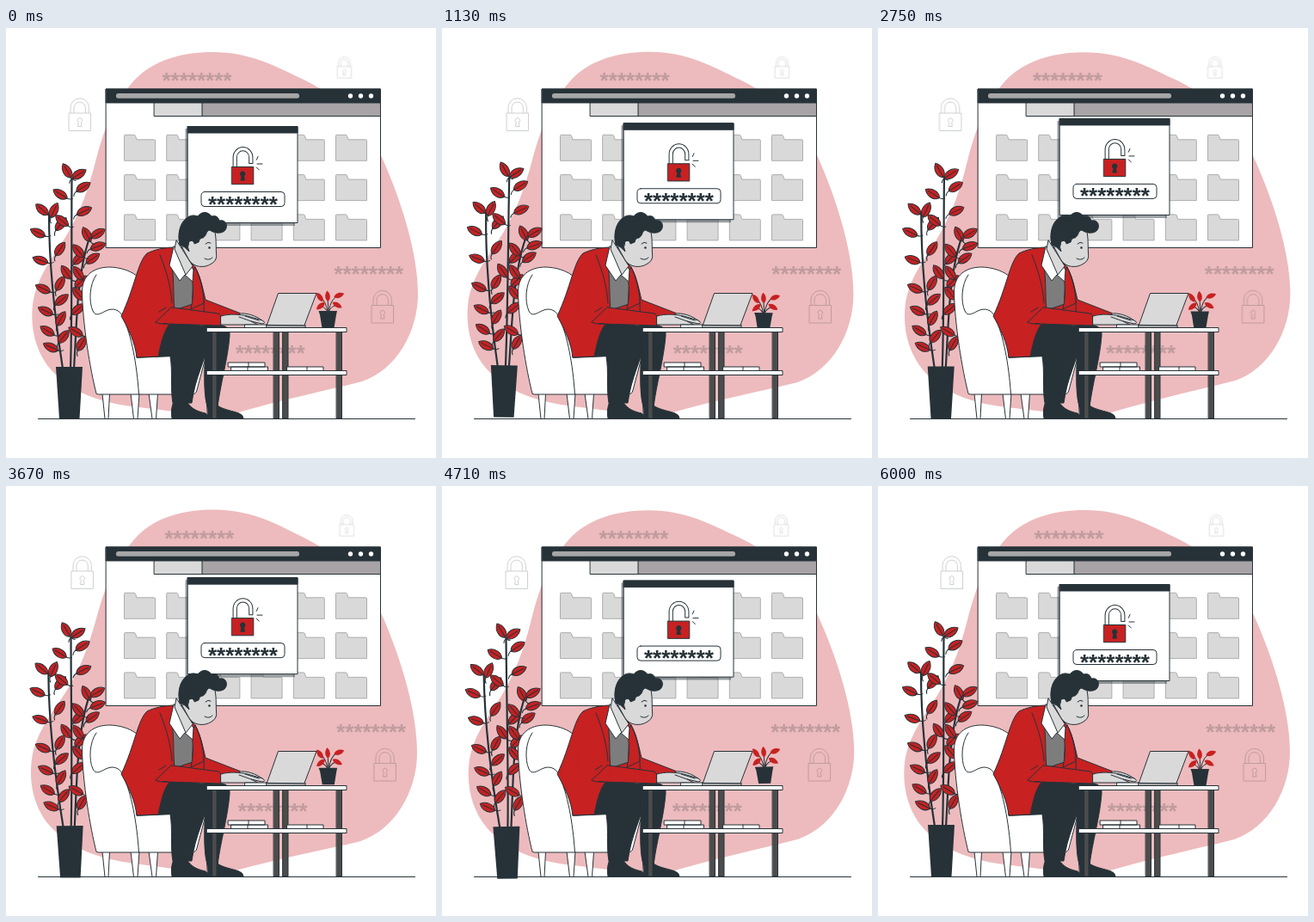
These frames come from a looping animation (500 by 500 pixels, 6.04 s). An HTML page:

```html
<!DOCTYPE html>
<html lang="en">
<head>
<meta charset="utf-8">
<title>Password security</title>
<style>
  html, body { margin: 0; width: 100%; height: 100%; overflow: hidden; background: #fff; }
  svg { display: block; width: 100%; height: 100%; }
  text { font: bold 26px "Liberation Sans", Arial, sans-serif; }
  .ink { fill: #263238; }
  .red { fill: #c72122; }
  .grey { fill: #d9d9d9; }
  .white { fill: #fff; }
  .none { fill: none; }
  .line { stroke: #263238; stroke-width: 1; stroke-linejoin: round; stroke-linecap: round; }
</style>
</head>
<body>
<svg viewBox="0 0 500 500">
  <defs>
    <path id="folder" d="M0 1.5Q0 .5 1 .5H11.5Q12.5 .5 13 1.5L14.5 6H35Q36 6 36 7V30.5H0Z" fill="#d9d9d9" stroke="#a6a6a6" stroke-width=".9"/>
    <g id="leaf">
      <path class="line" fill="none" stroke-width="1.5" d="M-15 3Q-13 0 -9 0"/>
      <path class="line red" d="M-9.5 0C-6 -6.5 4 -6.5 9.5 0C4 6 -6 6 -9.5 0Z"/>
      <path class="line none" stroke-width=".7" d="M-9 0H6"/>
    </g>
    <g id="padlock" fill="none" stroke="#263238">
      <path d="M0 18H25.5V38.5H0ZM2 18V11.5a10.7 10.7 0 0 1 21.4 0V18M6 18V11.8a6.7 6.7 0 0 1 13.4 0V18"/>
      <path d="M11.3 28.7a2.7 2.7 0 1 1 3 0L15 33.5H10.6Z"/>
    </g>
  </defs>

  <path id="blob" fill="#edbbbd" d="M240 28C284 28 312 44 346 60C392 82 424 118 440 157C460 203 479 262 479 309C479 352 455 397 414 411C370 422 318 433 270 447C238 453 180 444 139 439C98 432 73 420 52 397C35 377 28 350 31 322C35 290 54 268 71 240C91 206 99 175 106 148C115 116 125 88 149 61C171 37 206 28 240 28Z"/>

  <g id="hints" opacity=".23">
    <use href="#padlock" x="73" y="81"/>
    <use href="#padlock" transform="translate(385 33)scale(.65)"/>
    <use href="#padlock" x="425" y="304.5"/>
    <g class="ink">
      <text x="181.5" y="69.5">********</text>
      <text x="381.3" y="294.5">********</text>
      <text x="266.7" y="386.5">********</text>
    </g>
  </g>

  <path class="line none" d="M37.5 454.5H475.5"/>

  <g id="window">
    <path class="line white" d="M116.5 71H435.5V255.5H116.5Z"/>
    <path class="line ink" d="M116.5 71H435.5V87H116.5Z"/>
    <rect x="128" y="76" width="213" height="5.7" rx="2.5" fill="#a6a6a6"/>
    <g class="white">
      <circle cx="400.5" cy="79" r="2.7"/><circle cx="412.5" cy="79" r="2.7"/><circle cx="424.5" cy="79" r="2.7"/>
    </g>
    <path class="line" fill="#a8a3a6" d="M228 87H435.5V102.5H228Z"/>
    <path class="line grey" d="M172.5 87H228V102.5H172.5Z"/>
    <g id="folders"></g>
  </g>

  <g id="popup">
    <path fill="#263238" opacity=".45" d="M208.5 117H336V230H208.5Z"/>
    <path class="line white" d="M211.5 114.5H339V226.5H211.5Z"/>
    <path class="line ink" d="M211.5 114.5H339V122H211.5Z"/>
    <path fill="none" stroke="#263238" stroke-width="5.2" d="M266.2 162V150.5a9.3 9.8 0 0 1 18.6 0V158"/>
    <path fill="none" stroke="#fff" stroke-width="3.2" d="M266.2 162V150.5a9.3 9.8 0 0 1 18.6 0V157"/>
    <path class="line red" d="M262.7 161.5H287.8V181.7H262.7Z"/>
    <path class="ink" d="M273.4 172.3a3.2 3.2 0 1 1 3.6 0L278 177.5H272.4Z"/>
    <path class="line none" d="M291.3 153.3L293 149.5M292 158H298M291.3 162L294.3 165"/>
    <rect class="line white" x="227" y="190.5" width="97" height="17" rx="4"/>
    <text class="ink" x="235" y="213.5">********</text>
  </g>

  <g id="plants">
    <g class="line none" stroke-width="2.2">
      <path style="stroke-width:2.2" d="M75 396C77 340 76 230 76.500 176M66 396C58 345 50 285 50 217M79 396C82 350 82 290 96 247"/>
    </g>
    <g id="leaves"></g>
    <path class="ink" d="M58 394H89L85.500 454.500H62Z"/>
    <path class="line none" d="M374 330Q372 318 366 313M375 330Q374 316 374 309M375 330Q378 313 387 311M374 330Q370 323 364 323M375 330Q379 322 386 322"/>
    <g id="sprigs" class="red"></g>
    <path class="ink" d="M363.500 329H385L384 333.500L381.500 348.500H367.500L365 333.500Z"/>
  </g>

  <g id="chair" class="line white">
    <path d="M112 425L115 454.500H119L120.500 425ZM145 425L148.500 454.500H153L155 425ZM166 425L170 454.500H174.500L176.500 425Z"/>
    <path d="M105 425C98 398 89 344 88.500 306C89 288 101 278 121 278C141 279 157 287 165 305L235 372L222 421Q221 426 216 426H108Z"/>
    <path class="none" d="M105 287C97 298 96 318 101 329C104 336 110 332 116 329C124 325 132 327 136 336C146 358 152 390 154.500 426"/>
  </g>

  <g id="man">
    <path class="line ink" d="M228 346H252Q261 348 260 358C258 385 249 415 246 441L234 440C229 424 231 390 232 370Z"/>
    <path class="line ink" d="M152 383C151 363 161 343 180 340L226 346Q239 350 236 366C232 385 220 406 216 436H194C191 420 194 399 191 382Z"/>
    <path class="line ink" d="M195 434H210C216 444 224 446 232 448Q236 450 236 454H193Q191 444 195 434ZM234 439H246C253 444 263 445 271 448Q276 450 276 454H235Z"/>

    <path class="line grey" d="M270 332C280 331 290 334 299 341Q301 344 296 342L284 338L270 340Z"/>
    <path class="line red" d="M222 282C227 292 229 304 232 316L272 331.500L270 341L222 334Z"/>
    <path class="line red" d="M196 255C184 255 172 258 164 262C153 272 150 301 134 335C143 351 150 366 152 383L177 382C181 363 184 349 194 340L230 334C231 312 228 293 220 278Z"/>
    <path class="line" fill="#7d7d7d" d="M192 272L218 284C218 300 216 315 217 321L196 328C194 306 196 290 192 272Z"/>
    <path class="line red" d="M220 278C226 291 230 306 230 320L215 327C219 309 217 298 216 288Z"/>
    <path class="line white" d="M195 254L190 276L202 294L208 287L217 295L218 281L211 272Z"/>
    <path class="line grey" d="M198 247L196 257L209 287L217 277Z"/>
    <path class="line grey" d="M207 233L242 233C245 244 244 254 244.500 262Q246 270 239 274C230 280 218 278 213 270L202 250Z"/>
    <path class="line ink" d="M202 252C199 240 202 227 210 221Q216 216 223 219C227 213 235 213 239 219Q246 217 248 224C256 222 259 231 254 236C249 240 241 238 237 235C232 236 234 241 229 244Q225 244 224 249L219 251Q217 245 213 249Q210 255 213 260Q208 254 202 252Z"/>
    <path class="grey" d="M213 249Q218 246 219 253Q217 259 213 258Z"/>
    <circle class="ink" cx="236.500" cy="255.500" r="1.300"/>
    <path class="line none" d="M232 251Q235 248 238 250M231 268Q236 271 240 267"/>
    <path class="line red" d="M176 331L194 325L247 332Q251 333 250 346L188 344Q174 344 176 331Z"/>
    <path class="red" d="M158 300L184 283L193 324L194 343H177L157 337Z"/>
    <path class="line none" d="M179 264C187 283 192 303 193 320M174 342L193 324M178 330L186 325M188 344Q180 345 174 342"/>
    <path class="line grey" d="M250 335C260 332 272 333 281 335L298 340Q303 343 298 344L285 341L293 345H272L250 345Z"/>
    <path class="line none" d="M271 336L285 341M278 335L294 340"/>
  </g>

  <g id="desk" class="line">
    <path fill="#4c4c4c" d="M240 353H245V454H240ZM311.500 353H317.500V454H311.500ZM322 353H328V454H322ZM384.500 353H390.500V454H384.500Z"/>
    <path class="white" d="M233.500 348.500H396V353.500H233.500ZM233.500 398.500H396V403.500H233.500Z"/>
    <path class="white" d="M258.500 389H301V394H258.500ZM282 389V394M262 394H304.500V398.500H262ZM281 394V398.500M327 394H369V398.500H327ZM350 394V398.500"/>
    <path class="white" d="M278 345H304V348.500H278Z"/>
    <path fill="#a6a6a6" d="M303 345H348V348.500H303Z"/>
    <path class="grey" d="M303.500 345L316.500 308.500H361L347 345.500Z"/>
  </g>
</svg>

<script>
const LOOP = 6040, CYCLE = 6000, STEP = 40;
const el = id => document.getElementById(id);

// Leaves as centre x, centre y, direction of the tip in degrees.
const leaves = [
  [64, 228, -50], [65, 224, -140], [63, 257, -55], [63, 297, -60], [65, 316, -40],
  [64, 338, -60], [67, 359, -50], [85, 268, -45], [70, 284, -125], [87, 295, -45],
  [84, 327, -40], [84, 309, -130], [84, 285, -125], [81, 353, -150], [88, 367, -60],
  [101, 268, -35],
  [42, 211, -140], [56, 212, -65], [37, 238, -155], [40, 270, -160], [43, 303, -155],
  [46, 329, -155], [48, 352, -148], [52, 371, -155],
  [71, 166, -120], [85, 170, -32], [63, 193, -148], [90, 185, -32], [91, 213, -25],
  [94, 240, -118], [107, 239, -30], [107, 254, -20], [84, 259, -130]
];
const sprigs = [[365, 313, -125], [374, 312, -95], [387, 311, -20], [366, 323, 140], [385, 322, 30]];

el('leaves').innerHTML = leaves.map(([x, y, a]) =>
  `<use href="#leaf" transform="translate(${x} ${y})rotate(${a})"/>`).join('');
el('sprigs').innerHTML = sprigs.map(([x, y, a]) =>
  `<path transform="translate(${x} ${y})rotate(${a})" d="M-6 0C-3 -4 3 -3.500 6.500 0C3 3.500 -3 4 -6 0Z"/>`).join('');

let folders = '';
for (let row = 0; row < 3; row++)
  for (let col = 0; col < 6; col++)
    folders += `<use href="#folder" x="${137.5 + col * 49.2}" y="${123.8 + row * 46.3}"/>`;
el('folders').innerHTML = folders;

// Linear sway: 0, +1 at a quarter, -1 at three quarters, back to 0.
const sway = p => p < .25 ? 4 * p : p < .75 ? 2 - 4 * p : 4 * p - 4;
const move = (id, value) => el(id).setAttribute('transform', value);

function draw(time) {
  const p = time / CYCLE % 1;
  const half = 2 * p % 1;
  const turn = 2 * Math.PI * half;
  const drift = .7 + 2.2 * Math.cos(turn - .6 * Math.PI) + .65 * Math.sin(2 * turn);
  move('plants', `rotate(${sway(p)} 210 306)`);
  move('blob', `rotate(${sway(half)} 270 243)`);
  move('hints', `translate(${drift} 0)`);
  move('popup', `translate(0 ${-10 * (1 - Math.abs(1 - 2 * p))})`);
}

const start = performance.now();
function tick() {
  const elapsed = (performance.now() - start) % LOOP;
  draw(Math.floor(elapsed / STEP) * STEP);
  requestAnimationFrame(tick);
}
tick();
</script>
</body>
</html>
```
